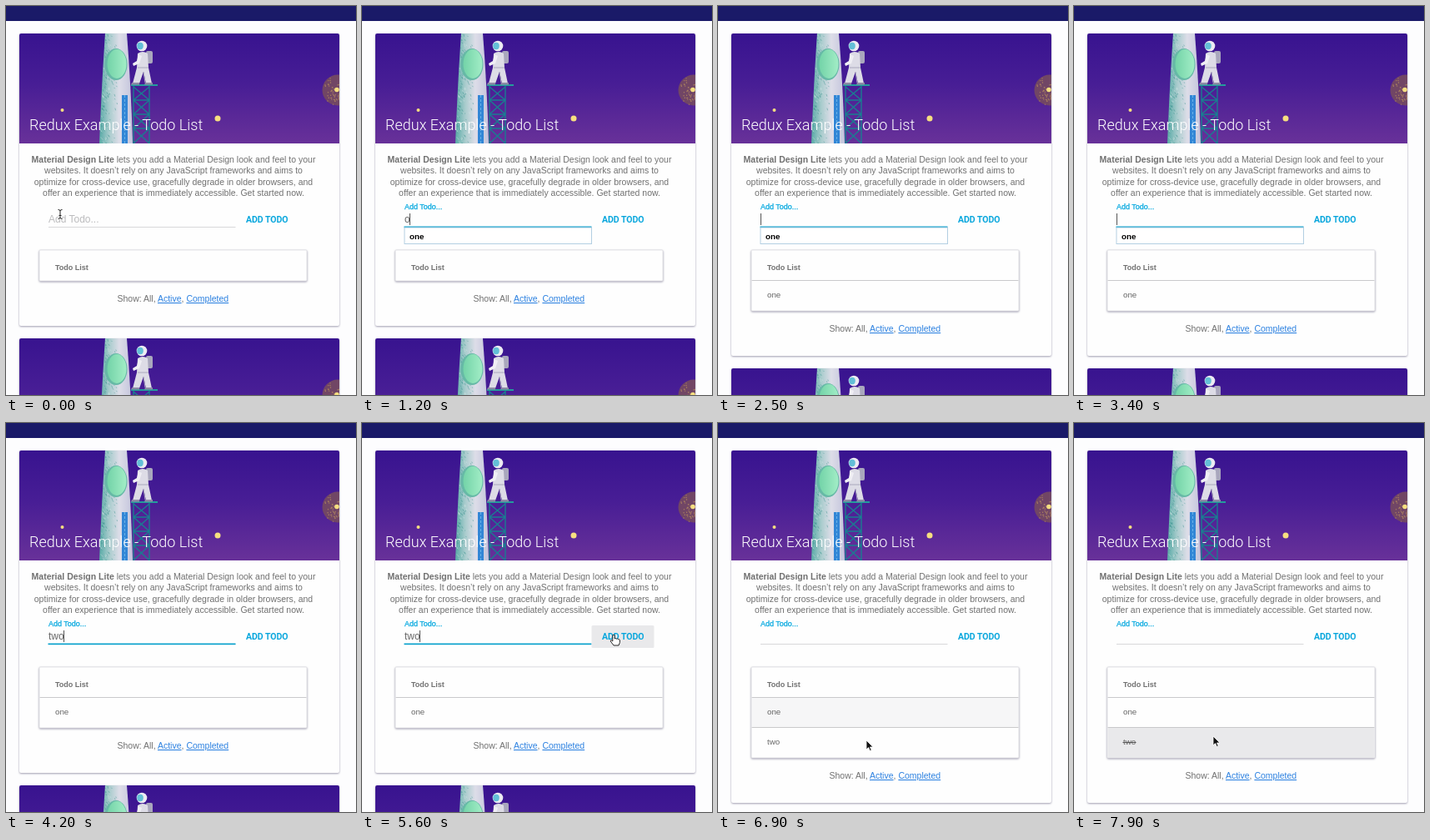
An HTML page for the animation above (8000 ms loop, 420 px wide and 467 px high).

```html
<!DOCTYPE html>
<html lang="en">
<head>
<meta charset="utf-8">
<title>Todo List</title>
<style>
  html, body { margin: 0; width: 100%; height: 100%; overflow: hidden; background: #fdfdfe; }
  svg { display: block; width: 420px; height: 467px; }
  text { font-family: "Liberation Sans", Arial, sans-serif; white-space: pre; }
  .body { font-size: 10.5px; fill: #707070; }
  .mid { text-anchor: middle; }
  .b { font-weight: 700; }
  .title { font: 300 18px Roboto, sans-serif; fill: #fff; }
  .btn { font: 500 10.5px Roboto, sans-serif; fill: #00a4dc; stroke: #00a4dc; stroke-width: .2; }
  .cell { font-size: 9.75px; fill: #666; }
  .link { fill: #2b80e0; text-decoration: underline; }
  .card { fill: #fefefe; filter: drop-shadow(0 1px 1px rgba(30, 25, 70, .42)); }
  .rule { stroke: #c9c9cb; stroke-width: 1; }
</style>
</head>
<body>
<svg viewBox="0 0 420 467">
  <defs>
    <linearGradient id="sky" x2="0" y2="1">
      <stop stop-color="#38138f"/><stop offset=".45" stop-color="#471d95"/><stop offset="1" stop-color="#683199"/>
    </linearGradient>
    <linearGradient id="hull">
      <stop stop-color="#58aaa6"/><stop offset=".3" stop-color="#a9cccd"/>
      <stop offset=".6" stop-color="#dddde8"/><stop offset="1" stop-color="#c3c4dc"/>
    </linearGradient>
    <linearGradient id="glass">
      <stop stop-color="#73d3a8"/><stop offset="1" stop-color="#a2edc6"/>
    </linearGradient>
    <clipPath id="frame"><path d="M16 165V35Q16 33 18 33H398Q400 33 400 35V165Z"/></clipPath>
    <g id="art" clip-path="url(#frame)">
      <rect x="16" y="33" width="384" height="132" fill="url(#sky)"/>
      <path d="M119 33H145Q150 95 152 165H112Q115 90 119 33Z" fill="url(#hull)"/>
      <g id="grain" stroke-width=".8"></g>
      <ellipse cx="132" cy="70" rx="13.5" ry="19" fill="#66b9a6"/>
      <ellipse cx="133" cy="69.5" rx="11.5" ry="17.5" fill="url(#glass)"/>
      <path d="M139 107H146V165H139Z" fill="#3286d6"/>
      <path d="M142.5 107V165" stroke="#68b4e9" stroke-width="1" stroke-dasharray="3 2"/>
      <g fill="none" stroke="#197d91" stroke-width="1.4">
        <path d="M153 96V165M172 96V165M153 97L172 113 153 130 172 147 153 165M172 97L153 113 172 130 153 147 172 165M153 113H172M153 130H172M153 147H172"/>
        <path d="M150 95H182" stroke="#239c9c" stroke-width="2.2"/>
      </g>
      <rect x="168" y="54" width="8" height="15" rx="2" fill="#a9a7bd"/>
      <path d="M158 57Q164 53 170 57L171 74 175 93H168L165 79 160 93H152L157 74Z" fill="#dddce6"/>
      <path d="M159 58L157 66 152 69 153 72 160 69 163 60Z" fill="#f0eff4"/>
      <path d="M158 74H171M165 79L167 92" stroke="#aaa8bd" fill="none"/>
      <path d="M151 92H160V94.500H150ZM167 92H176V94.500H166Z" fill="#8e8ba6"/>
      <circle cx="163" cy="48" r="6.300" fill="#ecebf2"/>
      <ellipse cx="161" cy="48" rx="3.800" ry="4.200" fill="#63bfd7"/>
      <circle cx="398" cy="101" r="18.500" fill="#714665"/>
      <g id="dust" fill="#ac825f"></g>
      <g fill="#f6df80">
        <circle cx="397" cy="100.500" r="2.800"/><circle cx="254" cy="135" r="3.500"/><circle cx="67.500" cy="125" r="2"/>
      </g>
    </g>
  </defs>

  <rect width="420" height="467" fill="#fdfdfe"/>
  <rect width="420" height="18" fill="#1a1a68"/>

  <rect id="card" class="card" x="16" y="33" width="384" rx="2"/>
  <use href="#art"/>
  <text class="title" x="28" y="148.500">Redux Example - Todo List</text>
  <g class="body mid">
    <text x="201" y="187.500"><tspan class="b">Material Design Lite</tspan> lets you add a Material Design look and feel to your</text>
    <text x="201" y="201">websites. It doesn’t rely on any JavaScript frameworks and aims to</text>
    <text x="201" y="214.500">optimize for cross-device use, gracefully degrade in older browsers, and</text>
    <text x="201" y="228">offer an experience that is immediately accessible. Get started now.</text>
  </g>

  <path d="M51 265.500H275.500" stroke="#d8d8da"/>
  <rect id="focusLine" y="264.500" height="1.700" fill="#0aa2cd"/>
  <text id="label" x="51">Add Todo...</text>
  <text id="typed" x="51" y="260" font-size="12" fill="#666"></text>
  <rect id="caret" y="249" width="1" height="14" fill="#555"/>
  <rect id="hover" x="275.500" y="243" width="75" height="27" rx="1.500" fill="#e9e9eb"/>
  <text class="btn" x="288" y="260.300">ADD TODO</text>

  <rect id="table" class="card" x="40" y="293" width="321" rx="1" stroke="#dedee1" stroke-width=".8"/>
  <text x="59" y="317.300" font-size="9" fill="#707070" class="b">Todo List</text>
  <g id="row1">
    <rect x="40.500" y="330" width="320" height="36" fill="#e9e9eb"/>
    <path class="rule" d="M40.500 329.500H360.500"/>
    <text class="cell" x="59" y="350.300">one</text>
  </g>
  <g id="row2">
    <rect x="40.500" y="366" width="320" height="36" fill="#e9e9eb"/>
    <path class="rule" d="M40.500 365.500H360.500"/>
    <text class="cell" x="59" y="386.300">two</text>
    <path id="strike" d="M58.500 383.500H74.500" stroke="#555" stroke-width="1"/>
  </g>
  <text id="filters" class="body" x="133.500" y="355">Show: All, <tspan class="link">Active</tspan>, <tspan class="link">Completed</tspan></text>

  <g id="next">
    <rect class="card" x="16" y="33" width="384" height="351" rx="2"/>
    <use href="#art"/>
  </g>

  <g id="popup">
    <rect x="51" y="266" width="224.500" height="19.500" fill="#fff" stroke="#b3cfe2"/>
    <text x="57" y="280" font-size="9.750" class="b">one</text>
  </g>

  <g id="pointer" stroke-linejoin="round">
    <g id="beam" fill="none">
      <path d="M-2.500-5.500Q0-5.500 0-4Q0-5.500 2.500-5.500M0-4V4M-2.500 5.500Q0 5.500 0 4Q0 5.500 2.500 5.500M-1.500 1.500H1.500" stroke="#fff" stroke-width="2.200"/>
      <path d="M-2.500-5.500Q0-5.500 0-4Q0-5.500 2.500-5.500M0-4V4M-2.500 5.500Q0 5.500 0 4Q0 5.500 2.500 5.500M-1.500 1.500H1.500" stroke="#222"/>
    </g>
    <path id="hand" d="M-1.200 .8Q0-.6 1.200 .8V5Q2.300 4 3.400 5.200 4.500 4.400 5.500 5.700 7 5.200 7.400 6.800V9.500L6 13H0L-3.600 8.200Q-4 6.600-2.600 6.800L-1.200 8Z" fill="#fff" stroke="#111" stroke-width=".9"/>
    <path id="arrow" d="M0 0V11L2.600 8.600 4.400 12.600 6.200 11.800 4.500 8H8Z" fill="#111" stroke="#fff" stroke-width=".8"/>
  </g>
</svg>

<script>
  const LOOP = 8000, STEP = 100, ROW = 36;
  const FOCUS = 400, ENTER = 2100, CLICK = 5900, DONE = 7500;
  const keys = [[FOCUS, ""], [1100, "o"], [1300, "on"], [1500, "one"], [ENTER, ""],
                [3700, "t"], [3900, "tw"], [4200, "two"], [CLICK, ""]];
  const moves = [[0, 65, 250], [4800, 125, 256], [5400, 302, 254], [6200, 302, 254],
                 [6900, 178, 381], [7200, 178, 381], [7400, 167, 376], [LOOP, 167, 376]];
  const advance = { o: .556, n: .556, e: .556, t: .278, w: .722 };

  const el = Object.fromEntries([...document.querySelectorAll("[id]")].map(n => [n.id, n]));
  const set = (node, attrs) => { for (const k in attrs) node.setAttribute(k, attrs[k]); };
  const show = (node, on) => { node.style.display = on ? "" : "none"; };
  const ramp = (t, start) => Math.min(1, Math.max(0, (t - start) / 200));
  const fade = (t, from, to) => ramp(t, from) * (1 - ramp(t, to));
  const mix = (a, b, p) => a + (b - a) * p;

  function pointerAt(t) {
    const i = moves.findIndex(m => m[0] > t);
    const [t0, x0, y0] = moves[i - 1], [t1, x1, y1] = moves[i];
    // the hidden stretch while typing holds its first place
    const p = t0 === 0 ? 0 : (t - t0) / (t1 - t0);
    return [mix(x0, x1, p), mix(y0, y1, p)];
  }

  function addTexture() {
    let seed = 11;
    const rnd = () => (seed = seed * 16807 % 2147483647) / 2147483647;
    let grain = "", dust = "";
    for (let i = 0; i < 150; i++) {
      const y = 34 + rnd() * 130, x = 119 - (y - 33) * .05 + rnd() * rnd() * 22;
      grain += `<path d="M${x} ${y}l${.5 + rnd()} ${1 + rnd() * 2}" stroke="${rnd() < .65 ? "#3e9591" : "#d5e5e6"}" opacity=".6"/>`;
    }
    for (let i = 0; i < 75; i++) {
      const a = rnd() * 2 * Math.PI, r = 4 + rnd() * 14;
      dust += `<circle cx="${398 + r * Math.cos(a)}" cy="${101 + r * Math.sin(a)}" r=".7"/>`;
    }
    el.grain.innerHTML = grain;
    el.dust.innerHTML = dust;
  }

  function render(t) {
    const rows = (t >= ENTER) + (t >= CLICK), shift = rows * ROW;
    set(el.card, { height: 351 + shift });
    set(el.table, { height: 37 + shift });
    set(el.filters, { y: 355 + shift });
    set(el.next, { transform: `translate(0 ${366 + shift})` });
    show(el.row1, rows > 0);
    show(el.row2, rows > 1);
    set(el.row1.firstElementChild, { opacity: fade(t, 6600, 6780) });
    set(el.row2.firstElementChild, { opacity: ramp(t, 6900) });
    show(el.strike, t >= DONE);

    const lift = ramp(t, FOCUS), focused = t >= FOCUS && t < CLICK;
    set(el.label, {
      y: mix(260, 243.5, lift), "font-size": mix(12, 9, lift),
      fill: lift ? "#00a7df" : "#bcbcbe",
      stroke: lift ? "#00a7df" : "none", "stroke-width": .25
    });
    set(el.focusLine, { x: mix(163, 50.5, lift), width: 225 * lift });
    show(el.focusLine, focused);

    const [keyTime, text] = keys.filter(k => k[0] <= t).pop() || [0, ""];
    el.typed.textContent = text;
    const width = [...text].reduce((w, c) => w + advance[c] * 12, 0);
    set(el.caret, { x: Math.round(50.5 + width) });
    show(el.caret, focused && (t - keyTime) % 1000 < 500);
    show(el.popup, t >= 1100 && t < 3700);
    set(el.hover, { opacity: fade(t, 5300, 6300) });

    const [x, y] = pointerAt(t);
    const inField = y < 270 && x < 275.5, onButton = y < 270 && x >= 275.5 && x < 350;
    set(el.pointer, { transform: `translate(${x} ${y})` });
    show(el.pointer, t < 1100 || t >= 4800);
    show(el.beam, inField);
    show(el.hand, onButton);
    show(el.arrow, !inField && !onButton);
  }

  addTexture();
  const begin = performance.now();
  function tick() {
    const t = (performance.now() - begin) % LOOP;
    render(Math.floor(t / STEP) * STEP);
    requestAnimationFrame(tick);
  }
  tick();
</script>
</body>
</html>
```
